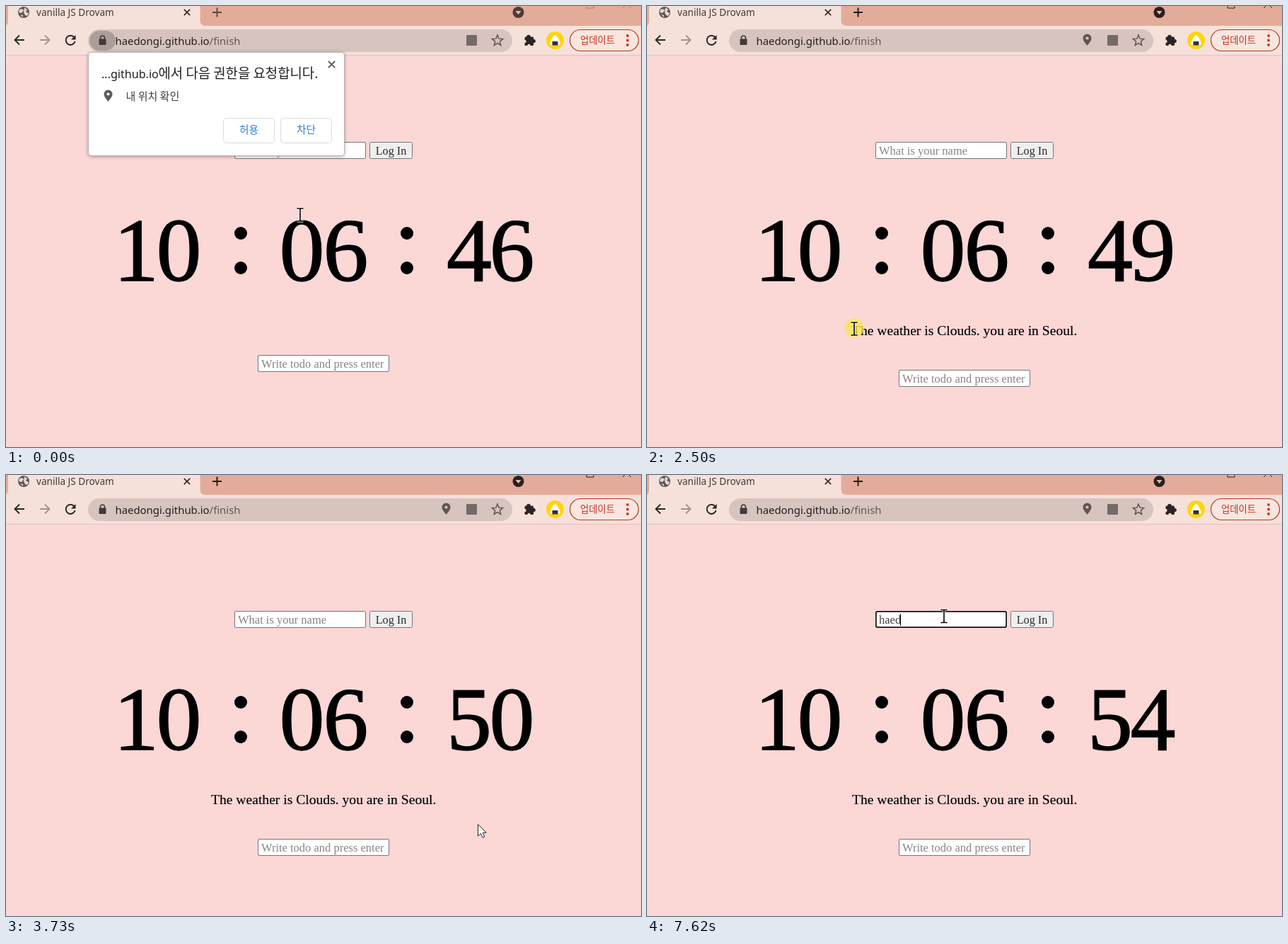
Write an HTML page with a canvas that moves like this. It is 898 px wide and 623 px high and loops after 7.99 s.

```html
<!DOCTYPE html>
<html lang="ko">
<head>
<meta charset="utf-8">
<style>
html, body { margin: 0; width: 100%; height: 100%; overflow: hidden; background: #fbd7d6; }
canvas { display: block; }
</style>
</head>
<body>
<canvas id="stage" width="898" height="623"></canvas>
<script>
const ctx = document.getElementById('stage').getContext('2d');
const LOOP = 7990;
const SERIF = '"Liberation Serif", serif';
const SANS = '"Noto Sans", "Open Sans", sans-serif';
const KOREAN = '"Noto Sans CJK KR", "Noto Sans CJK", sans-serif';
const USER = 'haedongi';
const WEATHER = 'The weather is Clouds. you are in Seoul.';

// Pointer path: time, x, y
const POINTER = [
  [70, 416, 295], [600, 338, 180], [1000, 338, 180], [1500, 112, 206],
  [1700, 112, 206], [2220, 285, 449], [2440, 285, 449], [2500, 293, 456],
  [2850, 559, 482], [3130, 617, 482], [3390, 617, 482], [3730, 667, 493],
  [3900, 667, 493], [4340, 420, 199.5]
];
const PRESSES = [[690, 820], [2500, 3190], [3390, 3520], [4540, 4670]];
const KEYSTROKES = [6070, 6810, 7350, 7620];

const within = (t, from, to) => t >= from && t < to;
const clamp = (v, lo, hi) => Math.min(hi, Math.max(lo, v));

function pointerAt(t) {
  const next = POINTER.findIndex(key => key[0] > t);
  if (next === 0) return POINTER[0].slice(1);
  if (next < 0) return POINTER[POINTER.length - 1].slice(1);
  const [t0, x0, y0] = POINTER[next - 1], [t1, x1, y1] = POINTER[next];
  const p = (t - t0) / (t1 - t0), e = p * p * (3 - 2 * p);
  return [x0 + (x1 - x0) * e, y0 + (y1 - y0) * e];
}

// An optional outline makes the text a little heavier.
function text(str, x, y, size, family, color, align = 'left', outline = 0) {
  ctx.font = `${size}px ${family}`;
  ctx.textAlign = align;
  ctx.fillStyle = color;
  ctx.fillText(str, x, y);
  if (!outline) return;
  ctx.strokeStyle = color;
  ctx.lineWidth = outline;
  ctx.strokeText(str, x, y);
}

function box(x, y, w, h, r, fill, stroke, width = 1) {
  ctx.beginPath();
  ctx.roundRect(x, y, w, h, r);
  if (fill) { ctx.fillStyle = fill; ctx.fill(); }
  if (stroke) { ctx.strokeStyle = stroke; ctx.lineWidth = width; ctx.stroke(); }
}

function dot(x, y, r, color) {
  ctx.beginPath();
  ctx.arc(x, y, r, 0, Math.PI * 2);
  ctx.fillStyle = color;
  ctx.fill();
}

function line(path, color, width) {
  ctx.strokeStyle = color;
  ctx.lineWidth = width;
  ctx.stroke(new Path2D(path));
}

function shape(path, color) {
  ctx.fillStyle = color;
  ctx.fill(new Path2D(path));
}

function cross(x, y, r, color, width) {
  line(`M${x - r} ${y - r}L${x + r} ${y + r}M${x + r} ${y - r}L${x - r} ${y + r}`, color, width);
}

function pin(x, y, color, hole) {
  shape(`M${x} ${y + 8}C${x - 3} ${y + 4} ${x - 6} ${y + 1} ${x - 6} ${y - 2.5}
    A6 6 0 0 1 ${x + 6} ${y - 2.5}C${x + 6} ${y + 1} ${x + 3} ${y + 4} ${x} ${y + 8}Z`, color);
  dot(x, y - 2.5, 2.1, hole);
}

function star(x, y, r) {
  ctx.beginPath();
  for (let i = 0; i < 10; i++) {
    const a = i * Math.PI / 5 - Math.PI / 2, d = i % 2 ? r * 0.44 : r;
    ctx.lineTo(x + d * Math.cos(a), y + d * Math.sin(a));
  }
  ctx.closePath();
  ctx.strokeStyle = '#5f5654';
  ctx.lineWidth = 1.5;
  ctx.stroke();
}

function tabStrip(active) {
  const ink = active ? '#1d1715' : '#574541';
  ctx.fillStyle = '#e3ac9a';
  ctx.fillRect(0, 0, 898, 30);
  shape('M0 28Q3 26 3 20V0H274.5V20Q274.5 28 282 28V29H0Z', '#f6e1da');

  dot(25, 9, 8, '#5d5856');
  shape('M19 5Q23 3 25 6L22 10L18 9ZM26 2L30 5L28 8L32 10L30 14L27 13L25 9ZM20 12L24 13L24 16Z', '#e8d7d1');
  text('vanilla JS Drovam', 43, 13.5, 13.6, SANS, '#403a38');
  cross(256, 9, 4.2, '#302a29', 1.7);
  line('M292 9H305M298.5 2.5V15.5', ink, 1.9);

  dot(724.5, 9, 8, active ? '#2b211f' : '#513c37');
  shape('M720.5 7H728.5L724.5 12Z', '#e9bcac');
  line('M821 0V3H831V0M872 3L875 0M884 3L881 0', active ? '#2b211f' : '#a57d71', 1);
}

function toolbar(t) {
  ctx.fillStyle = '#f6e1da';
  ctx.fillRect(0, 28, 898, 41);
  ctx.fillStyle = '#dcc3bd';
  ctx.fillRect(0, 69, 898, 1);

  line('M26 48H13M19 41.5L12.5 48L19 54.5', '#2a2524', 1.9);
  line('M48 48H61M55 41.5L61.5 48L55 54.5', '#a1918c', 1.8);
  line('M96.3 44A6.6 6.6 0 1 0 97.6 50', '#2a2524', 2);
  shape('M98.5 41V47.5H92Z', '#2a2524');

  box(116, 33, 600, 32, 16, '#d7c4be');
  if (t < 1100) box(118, 35, 37, 28, 14, '#ad9d99');
  box(131.5, 46.5, 10, 8.5, 1, '#403a39');
  line('M133.5 47V45A3 3 0 0 1 139.5 45V47', '#403a39', 1.6);
  const host = USER + '.github.io';
  text(host, 154.5, 54.5, 14.9, SANS, '#241f1e');
  text('/finish', 154.5 + ctx.measureText(host).width, 54.5, 14.9, SANS, '#625957');

  if (t >= 760) pin(622.5, 48, '#5f5654', '#d7c4be');
  box(651, 41, 15, 15, 1, '#746a68');
  star(695, 49, 8);

  box(733.5, 43.5, 12.5, 12.5, 1.5, '#2a2524');
  dot(739, 43.5, 2.8, '#2a2524');
  dot(746, 49.5, 2.8, '#2a2524');
  dot(733.5, 50, 2.2, '#f6e1da');
  dot(739.5, 56, 2.2, '#f6e1da');

  dot(776.5, 48.5, 12.5, '#ffd50a');
  shape('M776.5 41Q779 41 783 50Q785 55 782 55H771Q768 55 770 50Q774 41 776.5 41Z', '#fff');
  box(772.5, 50, 8, 5.5, 0.5, '#34313a');

  box(797.5, 33.5, 97, 30, 15, '#f8e6df', '#b8351f', 1.2);
  text('업데이트', 812, 53, 13.3, KOREAN, '#c5331f');
  for (const y of [42, 48.5, 55]) dot(879, y, 1.9, '#c5331f');
}

function clock(t) {
  const seconds = String(46 + Math.max(0, Math.floor((t - 85) / 997) + 1));
  const centers = [184, 244.5, 418.5, 480.5, 655, 715.5];
  [...'1006' + seconds].forEach((d, i) => text(d, centers[i], 388, 128, SERIF, '#000', 'center', 1.4));
  for (const x of [332, 567]) for (const y of [321, 370]) dot(x, y, 9, '#000');
}

function field(x, y, focused) {
  if (focused) box(x + 0.9, y + 0.9, 184.2, 22.2, 2, '#fff', '#101010', 1.7);
  else box(x + 0.5, y + 0.5, 185, 23, 1.5, '#fff', '#767676');
}

function loginForm(t) {
  field(323, 192, t >= 4540);
  const typed = USER.slice(0, KEYSTROKES.filter(k => t >= k).length);
  text(typed || 'What is your name', 328, 209.5, 16.5, SERIF, typed ? '#444' : '#8a8484');
  const caretOn = within(t, 4540, 5090) || within(t, 5610, 6620) || t >= 6810;
  if (caretOn) {
    ctx.fillStyle = '#000';
    ctx.fillRect(Math.floor(327.5 + (typed ? ctx.measureText(typed).width : 0)), 196, 1, 17);
  }
  box(514.5, 192.5, 60, 23, 2, '#efefef', '#767676');
  text('Log In', 544.5, 209.5, 16.2, SERIF, '#2a2a2a', 'center');
}

function weatherLine(color) {
  text(WEATHER, 290, 464.5, 19.6, SERIF, color, 'left', 0.15);
}

function weather(t, pointerX) {
  weatherLine('#000');
  if (!within(t, 2500, 3390)) return;
  const end = clamp(pointerX - 13, 290, 608);
  ctx.save();
  ctx.beginPath();
  ctx.rect(290, 448, end - 290, 21);
  ctx.clip();
  ctx.fillStyle = '#3390ff';
  ctx.fillRect(290, 448, 318, 21);
  weatherLine('#fff');
  ctx.restore();
}

function todoField(y) {
  field(356, y, false);
  text('Write todo and press enter', 361, y + 17.5, 16.5, SERIF, '#8a8484');
}

function drawPrompt() {
  ctx.save();
  ctx.shadowColor = 'rgba(60,30,30,.45)';
  ctx.shadowBlur = 5;
  ctx.shadowOffsetY = 1;
  box(116.5, 65.5, 362, 146, 4, '#fff');
  ctx.restore();
  box(116.5, 65.5, 362, 146, 4, '#fff', 'rgba(110,90,90,.4)');
  text('...github.io', 135, 102, 16.1, SANS, '#202124');
  text('에서 다음 권한을 요청합니다.', 215.5, 102, 18.85, KOREAN, '#202124');
  cross(460.5, 82.5, 4.7, '#55585c', 1.9);
  pin(144.5, 127, '#5c5c5f', '#fff');
  text('내 위치 확인', 169.5, 132.5, 15, KOREAN, '#3c3c3f');
  [['허용', 307], ['차단', 388]].forEach(([label, x]) => {
    box(x + 0.5, 158.5, 72, 35, 4, '#fff', '#dadce0');
    text(label, x + 36.5, 180, 14.7, KOREAN, '#2f7fd6', 'center');
  });
}

function permissionPrompt(t) {
  const gone = clamp((t - 870) / 300, 0, 1);
  if (gone === 1) return;
  ctx.save();
  ctx.globalAlpha = 1 - gone;
  ctx.translate(gone * 8, gone * 4);
  drawPrompt();
  ctx.restore();
}

function pointer(t, x, y) {
  if (PRESSES.some(([from, to]) => within(t, from, to))) dot(x, y - 1, 13.5, 'rgba(254,230,80,.8)');
  ctx.save();
  ctx.translate(x, y);
  if (t < 200 || within(t, 2150, 2640) || t >= 4270) {
    const beam = 'M-4.5 -9H-1L0 -8L1 -9H4.5M0 -8V8M-4.5 9H-1L0 8L1 9H4.5';
    line(beam, 'rgba(255,255,255,.8)', 3.5);
    line(beam, '#000', 1.6);
  } else {
    const arrow = 'M.5 .5V17L4.3 13.4L7 19.3L9.8 18L7.2 12.3H12.3Z';
    shape(arrow, '#fff');
    line(arrow, '#222', 1);
  }
  ctx.restore();
}

function draw(t) {
  const [x, y] = pointerAt(t), hasWeather = t >= 1280;
  ctx.fillStyle = '#fbd7d6';
  ctx.fillRect(0, 0, 898, 623);
  tabStrip(t >= 700);
  toolbar(t);
  loginForm(t);
  clock(t);
  if (hasWeather) weather(t, x);
  todoField(hasWeather ? 514 : 493);
  permissionPrompt(t);
  pointer(t, x, y);
}

const start = performance.now();
function frame() {
  draw((performance.now() - start) % LOOP);
  requestAnimationFrame(frame);
}
frame();
</script>
</body>
</html>
```
